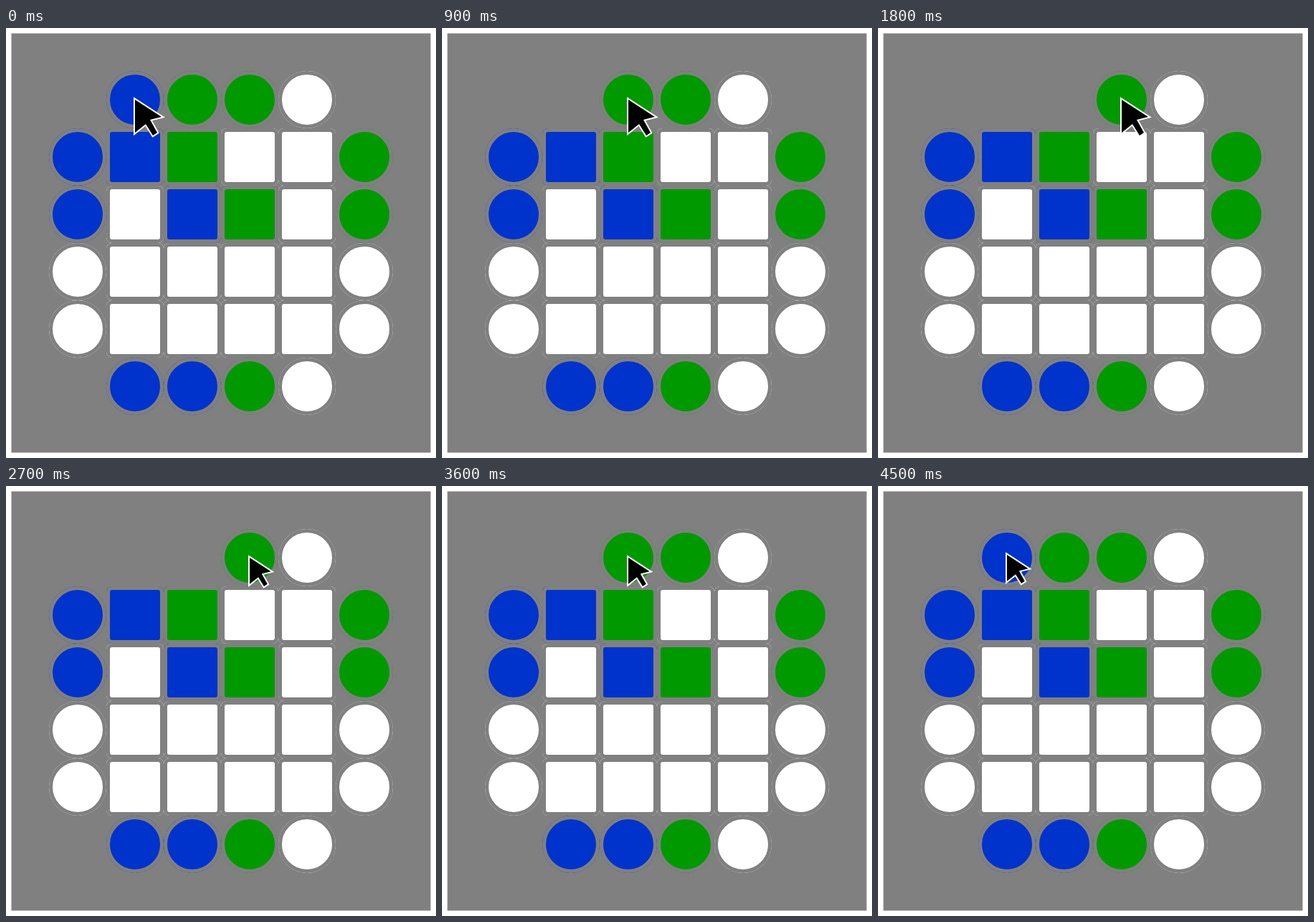
Animation of 600x600 px, one loop 4.8 s. Source, as an HTML page:

```html
<!DOCTYPE html>
<html lang="en">
<head>
<meta charset="utf-8">
<title>Board</title>
<style>
  html, body { margin: 0; width: 100%; height: 100%; overflow: hidden; background: #fff; }
  svg { display: block; width: 100vw; height: 100vh; }
  #cursor { transform-origin: 0 0; }
</style>
</head>
<body>
<svg viewBox="0 0 600 600">
  <rect x="7.5" y="7.5" width="585" height="585" fill="#808080"/>
  <g id="board"></g>
  <path id="cursor" d="M0 0 37 24 21 28 31 46 25 50 15 34 0 46Z" fill="#000" stroke="#fff"
    stroke-width="4" paint-order="stroke" vector-effect="non-scaling-stroke"/>
</svg>
<script>
const LOOP = 4800;
const STEPS = 16;
const HALF = STEPS / 2;
const PITCH = 80;
const COLORS = { w: '#fff', b: '#0033cc', g: '#009900' };
// Lower case: squares; upper case: circles.
const ROWS = ['.BGGW.', 'BbgwwG', 'BwbgwG', 'WwwwwW', 'WwwwwW', '.BBGW.'];

const board = document.getElementById('board');
const cursor = document.getElementById('cursor');
const place = index => 100 + PITCH * index;

function add(parent, tag, attrs) {
  const el = document.createElementNS('http://www.w3.org/2000/svg', tag);
  for (const key in attrs) el.setAttribute(key, attrs[key]);
  return parent.appendChild(el);
}

// A shape of the given half size, centred on its group.
function shape(parent, round, half, radius, paint) {
  if (round) add(parent, 'circle', { r: half, ...paint });
  else add(parent, 'rect', { x: -half, y: -half, width: 2 * half, height: 2 * half, rx: radius, ...paint });
}

// Hold frameAt(step) for each step of the loop.
function play(el, frameAt) {
  const keyframes = Array.from({ length: STEPS + 1 }, (_, i) =>
    ({ ...frameAt(i % STEPS), offset: i / STEPS, easing: 'step-end' }));
  el.animate(keyframes, { duration: LOOP, iterations: Infinity });
}

// Each half loop: press, two half-cell moves, press, two moves, press, rest.
function pointer(step) {
  const beat = (step + HALF - 1) % HALF;
  const moves = Math.min(4, beat - Math.floor(beat / 3));
  const outward = step > 0 && step <= HALF;
  const along = outward ? moves : 4 - moves;
  const lift = step > HALF ? 2 * Math.max(0, 2 - along) : 0;
  const scale = beat % 3 === 0 ? 0.8 : 1;
  return { transform: `translate(${place(1 + along / 2)}px, ${place(0) - lift}px) scale(${scale})` };
}

// Taken on the way out, put back on the way home.
const taken = (col, step) => step >= 3 * col - 2 && step < 18 - 3 * col;

ROWS.forEach((row, r) => [...row].forEach((cell, c) => {
  if (cell === '.') return;
  const round = cell < 'a';
  const group = add(board, 'g', { transform: `translate(${place(c)} ${place(r)})` });
  shape(group, round, 40, 8, { fill: COLORS[cell.toLowerCase()] });
  shape(group, round, 37.5, 5.5, { fill: 'none', stroke: '#808080', 'stroke-width': 5 });
  if (r === 0) play(group, step => ({ visibility: taken(c, step) ? 'hidden' : 'visible' }));
}));

play(cursor, pointer);
</script>
</body>
</html>
```
